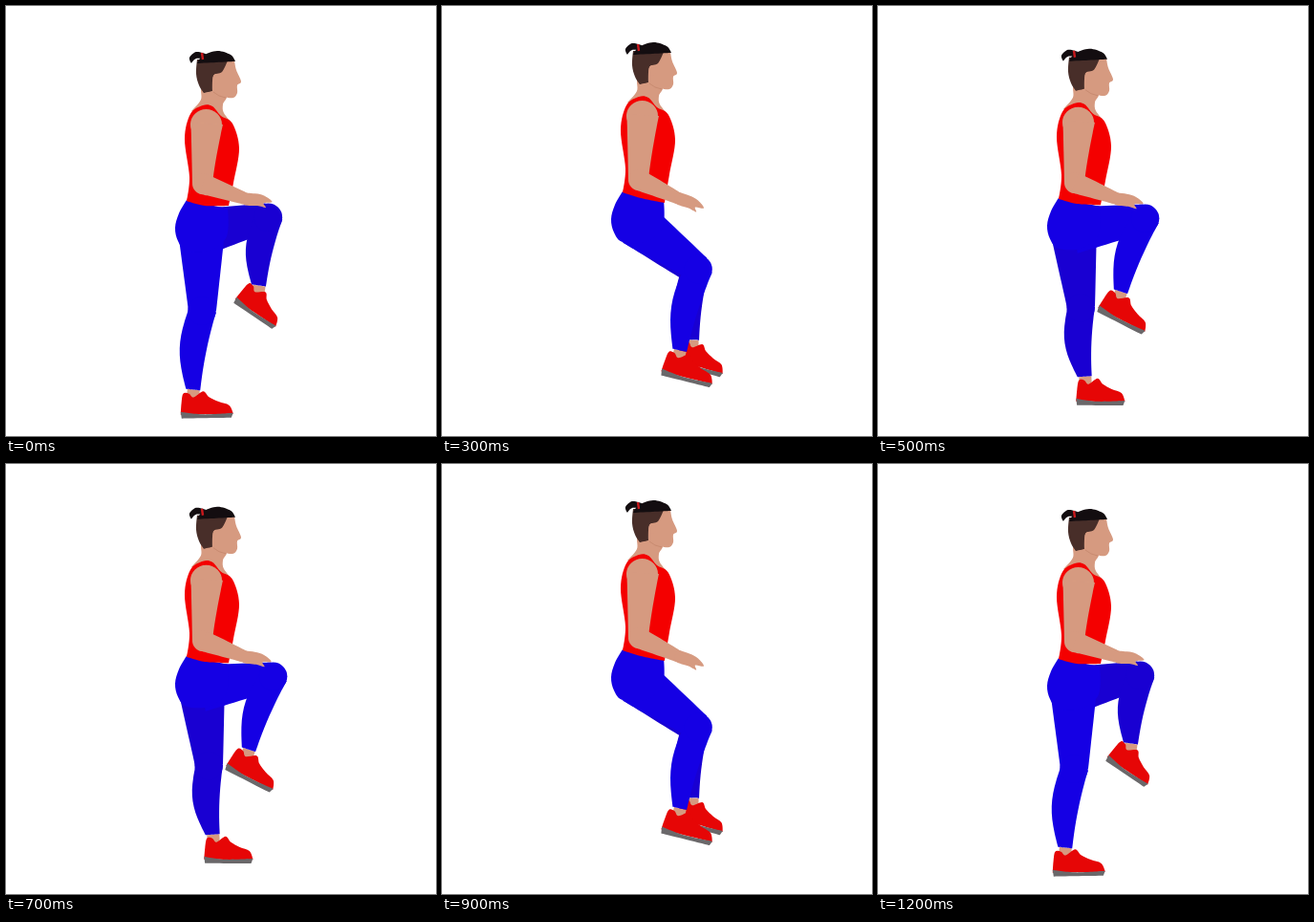
An HTML page with a canvas that plays this animation: 450 by 450 pixels, repeating every 1300 ms.

```html
<!DOCTYPE html>
<html lang="en">
<head>
<meta charset="utf-8">
<title>Marching in place</title>
<style>
  html, body { margin: 0; width: 100%; height: 100%; overflow: hidden; background: #fff; }
  canvas { display: block; width: 450px; height: 450px; }
</style>
</head>
<body>
<canvas id="stage" width="450" height="450"></canvas>
<script>
const ctx = document.getElementById('stage').getContext('2d');
const STEP = 100, COUNT = 13, RAD = Math.PI / 180;
const SKIN = '#d69a80', SHADE = '#c4876d', SHIRT = '#f40000', SHOE = '#e60606',
  HAIR = '#130d10', SIDES = '#482e29', SOLE = '#6a686a';

// Joint angles run from straight down, as [middle, swing] in degrees
const nearLeg = {
  color: '#1500e4', thigh: [53, 53], shin: [-12.5, -6.5], tilt: [14, 15], shoe: 1, shift: 0,
  thighLen: u => 79 - 4 * u,
  shinLen: u => 87 - 2 * u - 6 * u * u
};
const farLeg = {
  color: '#1900d2', thigh: [50, 52], shin: [-1.5, -6], tilt: [16, 18], shoe: .93, shift: 2,
  thighLen: u => 77 - 6 * u,
  shinLen: u => 72
};

// Smooth closed curve through the points; a third value of 1 marks a corner
function blob(color, pts) {
  const n = pts.length, at = i => pts[(i + n) % n];
  const tangent = (i, k) => at(i)[2] ? 0 : (at(i + 1)[k] - at(i - 1)[k]) / 6;
  ctx.beginPath();
  ctx.moveTo(pts[0][0], pts[0][1]);
  for (let i = 0; i < n; i++) {
    const [ax, ay] = at(i), [bx, by] = at(i + 1);
    ctx.bezierCurveTo(ax + tangent(i, 0), ay + tangent(i, 1),
      bx - tangent(i + 1, 0), by - tangent(i + 1, 1), bx, by);
  }
  ctx.fillStyle = color;
  ctx.fill();
}

function oval(color, x, y, rx, ry = rx) {
  ctx.beginPath();
  ctx.ellipse(x, y, rx, ry, 0, 0, 7);
  ctx.fillStyle = color;
  ctx.fill();
}

function line(color, width, ...pts) {
  ctx.strokeStyle = color;
  ctx.lineWidth = width;
  ctx.beginPath();
  pts.forEach(p => ctx.lineTo(...p));
  ctx.stroke();
}

// Tapered limb; front(t) and back(t) give the half widths along the bone
function limb(color, [x1, y1], [x2, y2], front, back) {
  const dx = x2 - x1, dy = y2 - y1, len = Math.hypot(dx, dy), n = 6;
  const side = (t, w, end) => [x1 + dx * t + dy / len * w, y1 + dy * t - dx / len * w, end];
  const pts = [];
  for (let i = 0; i <= n; i++) pts.push(side(i / n, front(i / n), i % n ? 0 : 1));
  for (let i = n; i >= 0; i--) pts.push(side(i / n, -back(i / n), i % n ? 0 : 1));
  blob(color, pts);
}

function reach([x, y], angle, len) {
  return [x + Math.sin(angle * RAD) * len, y + Math.cos(angle * RAD) * len];
}

function shoe(x, y, angle, scale) {
  ctx.save();
  ctx.translate(x, y);
  ctx.rotate(angle * RAD);
  ctx.scale(scale, 1);
  blob(SHOE, [[-11, 4], [-5, 4], [0, 8], [10, 2], [16, 8], [26, 13], [37, 17],
    [41, 26, 1], [-14, 26, 1], [-13, 14]]);
  blob(SOLE, [[-14, 23, 1], [10, 26], [41, 25, 1], [39, 30, 1], [-13, 30, 1]]);
  ctx.restore();
}

// u is -1 when standing on the leg and 1 when the knee is highest
function leg(g, hip, u) {
  const swing = ([mid, amount]) => mid + amount * u;
  const knee = reach(hip, swing(g.thigh), g.thighLen(u));
  const ankle = reach(knee, swing(g.shin), g.shinLen(u));
  line(SKIN, 13, ankle, reach(ankle, swing(g.shin), 10));
  shoe(ankle[0] + g.shift * (1 - u), ankle[1], swing(g.tilt), g.shoe);
  limb(g.color, hip, knee, t => 24 - 9 * t, t => 25 - 11 * t);
  limb(g.color, knee, ankle, t => 7 + 8 * (1 - t) ** 2, t => 14 - 6 * t + 8 * Math.sin(Math.PI * t));
  oval(g.color, ...knee, 14.7);
}

function head() {
  blob(SKIN, [[206, 76], [204, 89], [194, 101, 1], [212, 106], [237, 114, 1], [228, 103], [227, 94], [230, 84]]);
  blob(SKIN, [[216, 48, 1], [239, 48, 1], [241, 58], [246, 70], [242, 74], [242, 82], [238, 87], [229, 86], [216, 79]]);
  line(SHADE, .8, [217, 81], [223, 85], [230, 87]);
  blob(SIDES, [[200, 47, 1], [199, 62], [202, 74], [207, 82, 1], [216, 80, 1], [217, 64], [226, 60], [232, 48, 1]]);
  oval(SKIN, 220, 67.5, 3.6, 5.6);
  blob(HAIR, [[200, 51, 1], [206, 43], [221, 38], [235, 42], [240, 49, 1], [220, 50]]);
  blob(HAIR, [[194, 51, 1], [192, 45], [199, 39], [209, 41, 1], [208, 47, 1], [199, 46]]);
  line('#c8181c', 2.4, [205, 40], [206, 47]);
}

function torso(s) {
  blob(SHIRT, [[206, 95], [193, 104], [187, 130], [192, 170], [189, 195, 1], [208, 201 - s],
    [233, 206 - 6 * s, 1], [238, 176], [244, 140], [237, 114], [225, 106], [216, 96]]);
}

// The hand keeps its height while the shoulder rises and sinks
function arm(s) {
  const elbow = [206, 182 - 5 * s], wrist = [250 + 3 * s, 202.5 - 9 * s];
  oval(SKIN, 209.5, 115, 16.5, 16);
  limb(SKIN, [210, 114], elbow, t => 10 + 7 * (1 - t) ** 1.4, t => 16.5 - 5.5 * t);
  oval(SKIN, ...elbow, 11);
  limb(SKIN, elbow, wrist, t => 11 - 5 * t, t => 11 - 5 * t);
  ctx.save();
  ctx.translate(...wrist);
  ctx.rotate(-15 * s * RAD);
  blob(SKIN, [[-4, -7], [9, -4], [18, 1], [24, 9], [15, 8], [16, 13], [8, 9], [-5, 4]]);
  ctx.restore();
}

function draw(i) {
  const swing = Math.cos(i * Math.PI / 6);
  const s = swing * swing;
  const hip = [205, 228 + 8 * s];
  ctx.fillStyle = '#fff';
  ctx.fillRect(0, 0, 450, 450);
  leg(farLeg, hip, swing);
  leg(nearLeg, hip, -swing);

  ctx.save();
  ctx.translate(0, 9 * s);
  blob(nearLeg.color, [[189, 194, 1], [181, 208], [177, 223], [180, 237], [189, 247],
    [213, 247], [231, 232], [232, 203, 1]]);
  head();
  torso(s);
  arm(s);
  ctx.restore();
}

function tick(now) {
  draw(Math.floor(now / STEP) % COUNT);
  requestAnimationFrame(tick);
}
draw(0);
requestAnimationFrame(tick);
</script>
</body>
</html>
```
